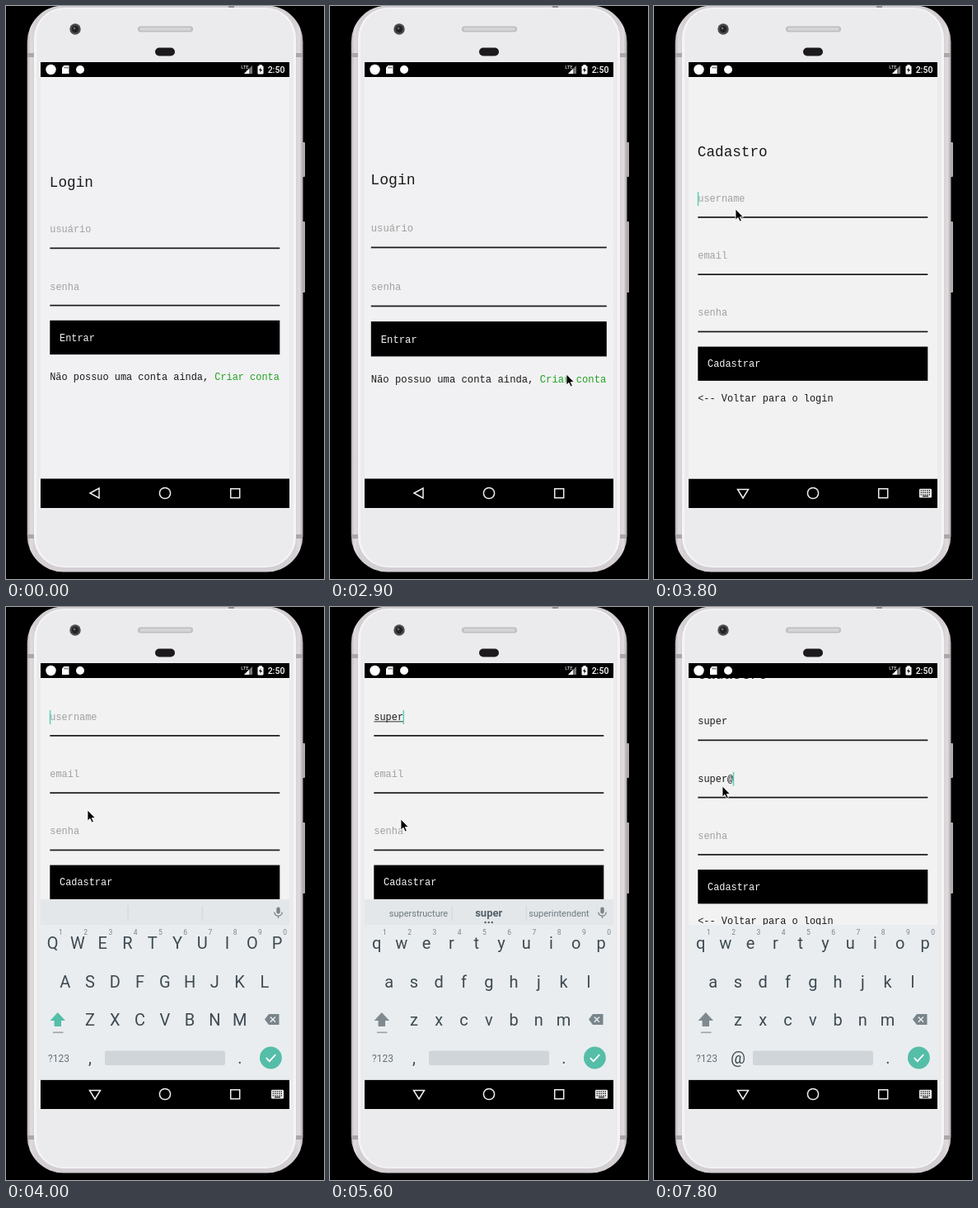
Animation of 386x694 px, one loop 8 s. Source, as an HTML page:

```html
<!DOCTYPE html>
<html lang="pt">
<head>
<meta charset="utf-8">
<title>Cadastro</title>
<style>
html, body { margin: 0; width: 100%; height: 100%; overflow: hidden; background: #000; }
svg { display: block; }
text { white-space: pre; }
.mono { font-family: "Liberation Mono", "Courier New", monospace; font-size: 11.92px; fill: #1b1b1b; }
.title { font-size: 17.7px; }
.hint { fill: #a0a0a0; }
.light { fill: #f4f4f4; }
.link { fill: #22a322; }
.ui { font-family: Roboto, sans-serif; text-anchor: middle; }
.key { font-size: 20px; fill: #3d4a50; }
.digit { font-size: 8.5px; fill: #78858b; }
.word { font-size: 11px; fill: #6d797f; }
.main { font-size: 13px; font-weight: 700; fill: #526068; }
.status { font-size: 10.5px; font-weight: 500; fill: #fff; }
.scene { transform-origin: 193px 329px; }
.icon { fill: none; stroke: #f0f0f0; stroke-width: 1.5; }
</style>
</head>
<body>
<svg id="stage" width="386" height="694" viewBox="0 0 386 694"></svg>
<script>
const LOOP = 8000, TICK = 100;
const LEFT = 53.3, WIDTH = 279, CHAR = 7.152, FIELD_GAP = 69.3;
const LOGIN_LINE = 293.3, SIGNUP_LINE = 255.8;

const rect = (x, y, w, h, fill, r = 0) =>
  `<rect x="${x}" y="${y}" width="${w}" height="${h}" rx="${r}" fill="${fill}"/>`;
const circle = (x, y, r, fill) => `<circle cx="${x}" cy="${y}" r="${r}" fill="${fill}"/>`;
const text = (x, y, cls, s, id = '') => `<text x="${x}" y="${y}" class="${cls}" id="${id}">${s}</text>`;
const screenRect = (y, h, fill) => rect(42, y, 302, h, fill);

function form(title, names, line, button, footer, footerGap, prefix) {
  const fields = names.map((name, i) => {
    const y = line + i * FIELD_GAP;
    return text(LEFT, y - 19, 'mono hint', name, prefix + i) +
      rect(LEFT, y - .8, WIDTH, 1.7, '#1a181b');
  }).join('');
  const top = line + (names.length - 1) * FIELD_GAP + 18.2;
  return text(LEFT - .5, line - 74.3, 'mono title', title) + fields +
    rect(LEFT, top, WIDTH, 41.3, '#000') +
    text(65, top + 24.8, 'mono light', button) +
    text(LEFT - .1, top + footerGap, 'mono', footer);
}

function phone() {
  const band = y => rect(26, y, 9, 5, '#aaa6a9') + rect(351, y, 9, 5, '#aaa6a9');
  return `<defs>
    <linearGradient id="rim">
      <stop offset="0" stop-color="#b9b4b8"/><stop offset=".012" stop-color="#dfdbdf"/>
      <stop offset=".03" stop-color="#d3cfd3"/><stop offset=".97" stop-color="#d3cfd3"/>
      <stop offset=".988" stop-color="#dfdbdf"/><stop offset="1" stop-color="#aca7ab"/>
    </linearGradient></defs>` +
    rect(358, 165, 5, 42, '#b3adb1', 1) + rect(358, 261, 5, 86, '#b3adb1', 1) +
    rect(25.7, -.5, 334.8, 686, 'url(#rim)', 44) + band(57) + band(640) +
    rect(270, 0, 7, 3, '#8e8a8d') +
    rect(34, 2, 318, 678, '#f5f5f6', 37) + rect(37, 3.5, 312, 675, '#ebebed', 34) +
    circle(84, 28, 6.7, '#4b494c') + circle(84, 28, 4.2, '#232125') + circle(83, 27, 1.4, '#66656a') +
    rect(160, 24.5, 67, 7, '#bdbcbf', 3.5) + rect(162, 26, 63, 4, '#d4d3d6', 2) +
    rect(181, 50.5, 24, 10, '#1d1a1e', 5) +
    screenRect(68, 540, '#000');
}

function statusBar() {
  return circle(54.5, 77, 6.2, '#fff') + circle(90, 77, 5, '#fff') +
    '<path d="M70.5 72H76.5V82H68V74.5Z" fill="#fff"/>' +
    '<path d="M71.5 73.5v2M73.2 73.5v2M74.9 73.5v2" stroke="#000" stroke-width=".7"/>' +
    '<text x="290" y="76" class="ui" font-size="6" fill="#fff">LTE</text>' +
    '<path d="M289 82L299 72V82Z" fill="#777"/><path d="M289 82L295 76V82Z" fill="#fff"/>' +
    rect(305.5, 72.5, 7, 10, '#fff', 1) + rect(307.3, 71.2, 3.4, 2, '#fff') +
    '<path d="M309.6 74L307 78H308.7L308.2 81L311 77H309.2Z" fill="#000"/>' +
    text(328, 81, 'ui status', '2:50');
}

function navBar() {
  let keys = '';
  for (let i = 0; i < 15; i++) keys += rect(323.6 + i % 5 * 2.5, 586.2 + Math.floor(i / 5) * 2.5, 1.3, 1.3, '#000');
  return '<path id="back" class="icon" d="M102 590L113 584V596Z"/>' +
    '<path id="down" class="icon" d="M101.5 585.5H114.5L108 596Z"/>' +
    '<circle class="icon" cx="193" cy="590" r="6.6"/>' +
    '<rect class="icon" x="272.7" y="584.7" width="11" height="11"/>' +
    `<g id="imeIcon">${rect(322, 584.8, 15, 10.6, '#f0f0f0', 1.2)}${keys}${rect(326, 593.2, 7, 1.1, '#000')}</g>`;
}

function keyboard() {
  const rows = [['qwertyuiop', 56.6, 414], ['asdfghjkl', 71.7, 460.5], ['zxcvbnm', 102, 506.7]];
  const letters = rows.map(([chars, x, y]) =>
    [...chars].map((c, i) => text(x + i * 30.27, y, 'ui key letter', c)).join('')).join('');
  const digits = [...'1234567890'].map((d, i) => text(66.3 + i * 30.27, 397, 'ui digit', d)).join('');
  const dots = [188.6, 192.7, 196.8].map(x => circle(x, 382, 1.2, '#526068')).join('');
  return `<g id="strip">${screenRect(354, 31, '#e4e7ea')}
    ${rect(147.6, 362, 1, 18, '#d0d5d8')}${rect(237.6, 362, 1, 18, '#d0d5d8')}
    ${rect(328.3, 363.5, 4.4, 8, '#78858b', 2.2)}
    <path d="M325.8 369.5a4.7 4.7 0 0 0 9.4 0M330.5 374V377" fill="none" stroke="#78858b" stroke-width="1.3"/>
    <g id="words">${text(107.5, 375, 'ui word', '', 'w0')}${text(192.7, 375, 'ui main', '', 'w1')}
    ${text(278, 375, 'ui word', '', 'w2')}${dots}</g></g>` +
    screenRect(385, 188, '#eaedf0') + digits + letters +
    '<path id="shift" d="M62.8 491L72 501H67V508H58.6V501H53.6Z"/>' +
    rect(57, 514.5, 12.5, 1.6, '#9aa3a8') +
    '<path d="M314 499.5L319 493H331.5V506H319Z" fill="#78858b"/>' +
    '<path d="M320.8 496.5L327 502.7M327 496.5L320.8 502.7" stroke="#eaedf0" stroke-width="1.4"/>' +
    '<text x="64" y="550.5" class="ui" font-size="12" fill="#647178">?123</text>' +
    text(102, 552.5, 'ui key', ',', 'mark') + rect(120, 537.5, 146, 17.5, '#d0d5d9', 2.5) +
    text(284, 552.5, 'ui key', '.') + circle(321.4, 546, 13.4, '#55bea8') +
    '<path d="M315.8 546.2L319.8 550.2L327.2 542.2" fill="none" stroke="#fff" stroke-width="1.8"/>';
}

document.getElementById('stage').innerHTML = phone() + statusBar() +
  `<svg x="42" y="86" width="302" height="486.5" viewBox="42 86 302 486.5">
    ${screenRect(86, 487, '#f1f1f3')}
    <g id="login" class="scene">${form('Login', ['usuário', 'senha'], LOGIN_LINE, 'Entrar',
      'Não possuo uma conta ainda, <tspan class="link">Criar conta</tspan>', 71.7, 'l')}</g>
    <g id="signup" class="scene">${screenRect(86, 487, '#f2f2f2')}
      <g id="content">${form('Cadastro', ['username', 'email', 'senha'], SIGNUP_LINE, 'Cadastrar',
        '&lt;-- Voltar para o login', 65.9, 's')}
        <rect id="under" x="${LEFT}" y="238.3" height="1" fill="#333"/>
        <rect id="caret" width="1.5" height="17" fill="#58d3ba"/></g></g>
    <g id="keyboard">${keyboard()}</g>
  </svg>` + navBar() +
  `<path id="mouse" d="M0 0V13L3 10.3L5.2 15L7.3 14L5.2 9.6H9.3Z" fill="#000" stroke="#fff" stroke-width=".8"/>`;

const $ = Object.fromEntries([...document.querySelectorAll('[id]')].map(e => [e.id, e]));
const letters = [...document.querySelectorAll('.letter')].map(el => ({ el, c: el.textContent }));

// Each entry: time, x, y of the pointer tip.
const POINTER = [
  [1400, 20, 502], [1600, 130, 516], [1800, 262, 517], [1900, 284, 510], [2000, 285, 498],
  [2200, 288, 449], [2300, 286.5, 447], [2500, 286.5, 447], [2600, 287, 446], [3100, 287, 446],
  [3300, 205, 345], [3500, 112, 258], [3600, 99, 246], [5500, 99, 246], [5600, 86, 257],
  [5800, 78, 240], [6100, 83, 217], [LOOP, 83, 217]
];
const USER = [[0, ''], [4600, 's'], [4700, 'su'], [4900, 'sup'], [5000, 'supe'], [5100, 'super']];
const MAIL = [[0, ''], [6800, 's'], [6900, 'su'], [7100, 'sup'], [7300, 'super'], [7800, 'super@']];
const WORDS = [
  [0, null], [4600, ['so', 'she']], [4700, ['such', 'sure']], [4900, ['support', 'supper']],
  [5000, ['superb', 'superior']], [5300, ['superstructure', 'superintendent']]
];

const latest = (steps, t) => steps.filter(s => s[0] <= t).pop()[1];
const between = (t, a, b) => t >= a && t < b;
const ramp = (t, a, b) => Math.min(1, Math.max(0, (t - a) / (b - a)));
const show = (el, on) => { el.style.display = on ? '' : 'none'; };

function pointerAt(t) {
  const i = Math.max(1, POINTER.findIndex(p => p[0] >= t));
  const [a, b] = [POINTER[i - 1], POINTER[i]], k = ramp(t, a[0], b[0]);
  return [a[1] + (b[1] - a[1]) * k, a[2] + (b[2] - a[2]) * k];
}

function fill(el, value, hint) {
  el.textContent = value || hint;
  el.classList.toggle('hint', !value);
}

function drawScenes(t) {
  const p = 1 - (1 - ramp(t, 2870, 3270)) ** 3.7;
  show($.login, p < 1);
  $.login.style.transform = `scale(${1 + .1 * p})`;
  $.login.style.opacity = 1 - ramp(p, .3, 1);
  show($.signup, p > .75);
  $.signup.style.transform = `scale(${.85 + .15 * p})`;
  $.signup.style.opacity = ramp(p, .75, .875);
}

function drawForm(t) {
  const user = latest(USER, t), mail = latest(MAIL, t), onMail = t >= 6300;
  fill($.s0, user, 'username');
  fill($.s1, mail, 'email');
  const scroll = t < 3900 ? 0 : t < 6400 ? -100 : -94.5;
  $.content.setAttribute('transform', `translate(0 ${scroll})`);
  $.caret.setAttribute('x', LEFT - .5 + (onMail ? mail : user).length * CHAR);
  $.caret.setAttribute('y', SIGNUP_LINE - 30.8 + (onMail ? FIELD_GAP : 0));
  show($.caret, t >= 3800 && !between(t, 4300, 4600) && !between(t, 5800, 6300));
  $.under.setAttribute('width', user.length * CHAR);
  show($.under, between(t, 5300, 6300));
}

function drawKeyboard(t) {
  const upper = t < 4600 || between(t, 6300, 6800), words = latest(WORDS, t);
  show($.keyboard, t >= 3900);
  $.keyboard.setAttribute('transform', `translate(0 ${219 * (1 - ramp(t, 3800, 4000)) ** 2})`);
  for (const { el, c } of letters) el.textContent = upper ? c.toUpperCase() : c;
  $.shift.setAttribute('fill', upper ? '#55bea8' : '#7f8a90');
  $.mark.textContent = t >= 6300 ? '@' : ',';
  show($.strip, t < 6400);
  show($.words, words && t < 6300);
  if (words) [$.w0.textContent, $.w2.textContent] = words;
  $.w1.textContent = latest(USER, t);
  show($.back, t < 3800);
  show($.down, t >= 3800);
  show($.imeIcon, t >= 3800);
}

function draw(t) {
  drawScenes(t);
  drawForm(t);
  drawKeyboard(t);
  show($.mouse, t >= 1400);
  $.mouse.setAttribute('transform', `translate(${pointerAt(t)})`);
}

const start = performance.now();
function frame() {
  const t = (performance.now() - start) % LOOP;
  draw(Math.floor(t / TICK) * TICK);
  requestAnimationFrame(frame);
}
frame();
</script>
</body>
</html>
```
